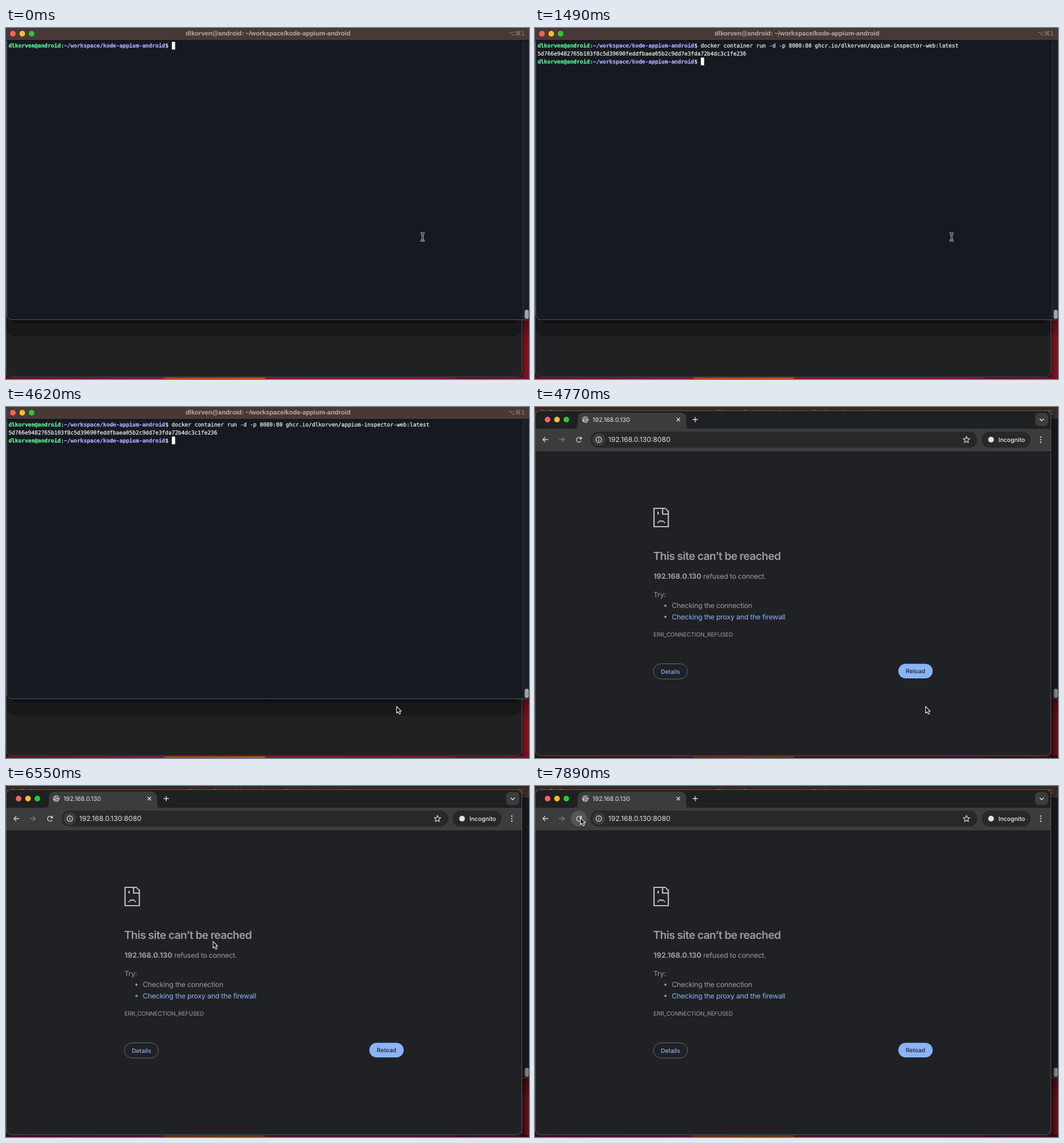
An HTML page with a canvas for the animation above (8000 ms loop, 914 by 613 pixels).

```html
<!DOCTYPE html>
<html lang="en">
<head>
<meta charset="utf-8">
<title>Terminal and browser</title>
<style>
  html, body { margin: 0; width: 100%; height: 100%; overflow: hidden; background: #202124; }
  canvas { display: block; }
</style>
</head>
<body>
<canvas id="stage" width="914" height="613"></canvas>
<script>
const ctx = document.getElementById('stage').getContext('2d');
const LOOP = 8000, STEP = 148;
const UI = 'Inter, "Liberation Sans", sans-serif';
const MONO = '"DejaVu Sans Mono", monospace';
const CELL = 5.703, LEFT = 4.4, ROW = 13.8;
const USER = 'dlkorven', FOLDER = '~/workspace/kode-appium-android';
const COMMAND = `docker container run -d -p 8080:80 ghcr.io/${USER}/appium-inspector-web:latest`;
const HASH = '5d766e9482765b103f8c5d39690feddfbaea05b2c9dd7e3fda72b4dc3c1fe236';
const PROMPT_LENGTH = 50;
const BROWSER_AT = 4770;

function rect(x, y, w, h, fill) {
  ctx.fillStyle = fill;
  ctx.fillRect(x, y, w, h);
}

function rounded(x, y, w, h, radius, fill, stroke) {
  ctx.beginPath();
  ctx.roundRect(x, y, w, h, radius);
  if (fill) { ctx.fillStyle = fill; ctx.fill(); }
  if (stroke) { ctx.lineWidth = 1; ctx.strokeStyle = stroke; ctx.stroke(); }
}

function dot(x, y, r, fill) {
  ctx.beginPath();
  ctx.arc(x, y, r, 0, 7);
  ctx.fillStyle = fill;
  ctx.fill();
}

function line(path, color, width = 1.3) {
  ctx.strokeStyle = color;
  ctx.lineWidth = width;
  ctx.stroke(new Path2D(path));
}

function text(value, x, y, font, color, spacing = 0, align = 'left') {
  ctx.font = font;
  ctx.fillStyle = color;
  ctx.letterSpacing = spacing + 'px';
  ctx.textAlign = align;
  ctx.fillText(value, x, y);
}

function gradient(x0, y0, x1, y1, ...stops) {
  const g = ctx.createLinearGradient(x0, y0, x1, y1);
  stops.forEach(([at, color]) => g.addColorStop(at, color));
  return g;
}

function lights(x, y) {
  ['#ff5f57', '#febc2e', '#28c840'].forEach((color, i) => dot(x + i * 16.4, y, 4.9, color));
}

// Terminal text gets a hairline outline for a slightly heavier weight.
function mono(value, column, row, color, weight = 400) {
  const x = LEFT + column * CELL, y = 34 + row * ROW;
  text(value, x, y, `${weight} 9.47px ${MONO}`, color);
  ctx.strokeStyle = color;
  ctx.lineWidth = 0.25;
  ctx.strokeText(value, x, y);
}

function prompt(row) {
  const host = USER + '@android';
  mono(host, 0, row, '#5cf59a', 700);
  mono(':', 16, row, '#f0f0f0');
  mono(FOLDER, 17, row, '#aaa9fb', 700);
  mono('$', 48, row, '#f0f0f0');
}

function drawDesktop() {
  rect(0, 0, 914, 613, '#2a1215');
  rect(901, 505, 13, 108, gradient(901, 0, 914, 0, [0, '#4c0e16'], [0.5, '#70131e'], [1, '#7c1521']));
  rect(901, 505, 13, 40, gradient(0, 505, 0, 545, [0, 'rgba(0,0,0,.4)'], [1, 'rgba(0,0,0,0)']));
  rect(0, 610, 914, 3, gradient(0, 0, 914, 0, [0, '#64121e'], [0.15, '#70152a'], [0.302, '#7c1a48'],
    [0.304, '#b04014'], [0.494, '#b84c14'], [0.496, '#84182a'], [0.856, '#7c1634'], [0.86, '#5c1220'], [1, '#701420']));
}

function drawTerminal(t) {
  rounded(0.5, 6.5, 901, 602.5, 9, '#202123', '#47484a');
  rounded(1, 490, 900, 48, [0, 0, 14, 14], '#17181a');
  rounded(10, 490, 884, 27, [0, 0, 12, 12], gradient(0, 509, 0, 517, [0, '#0a0b0d'], [1, '#121315']));

  rounded(1.5, -10, 920, 519.5, 9, '#151a20', '#55585b');
  rect(903, 22, 11, 486, '#1c2025');
  rect(903, 22, 1, 486, '#2c3034');
  rounded(906.5, 492, 7, 16, 3.5, '#a3a4a5');
  rect(0, 0, 914, 21, '#483936');
  rect(0, 21, 914, 1, '#0d0f12');
  lights(12, 10);
  text(`${USER}@android: ${FOLDER}`, 458, 13, 'bold 11.1px "Liberation Sans", sans-serif', '#b6aca9', 0, 'center');
  text('⌥⌘1', 907, 13, '10.5px "DejaVu Sans", sans-serif', '#93878a', 0, 'right');

  prompt(0);
  if (t >= 750) mono(COMMAND, PROMPT_LENGTH, 0, '#f0f0f0');
  if (t >= 1340) mono(HASH, 0, 1, '#f0f0f0');
  if (t >= 1490) prompt(2);
  const [column, row] =
    t < 750 ? [PROMPT_LENGTH, 0] :
    t < 1190 ? [PROMPT_LENGTH + COMMAND.length, 0] :
    t < 1340 ? [0, 1] :
    t < 1490 ? [0, 2] : [PROMPT_LENGTH, 2];
  rect(LEFT + column * CELL + 0.3, 24 + row * ROW, 5.7, 13.6, '#fafafa');
}

function drawTabs() {
  rect(1, 7, 900, 31, '#1f2021');
  lights(22, 22);
  rounded(75, 10, 189, 30, [9, 9, 0, 0], '#3c3c3c');
  line('M67 38.5Q75 38 75 30V39H67M272 38.5Q264 38 264 30V39H272', '#3c3c3c', 1);
  dot(88, 22, 5.8, '#b5b7ba');
  line('M83 20l4 1 1 3 -1 3M88 17l0 2 3 1 2 -1M92 25l-2 -2', '#3c3c3c', 1.2);
  text('192.168.0.130', 100.5, 25.5, `10.6px ${UI}`, '#e3e3e3');
  line('M247.5 19l6 6M253.5 19l-6 6M275.5 22h9M280 17.5v9', '#dedede');
  rounded(874, 10.5, 23, 23, 7, '#3c3c3c');
  line('M882 20.5l3.5 3.5 3.5-3.5', '#e3e3e3', 1.5);
}

function drawToolbar(hover) {
  rect(1, 38, 900, 38, '#3c3c3c');
  rect(1, 76, 900, 1, '#48494a');
  line('M23 57H14M18 52.8L13.8 57 18 61.2', '#d5d5d5');
  line('M42 57h9M47 52.8L51.2 57 47 61.2', '#7b7b7b');
  if (hover) dot(77, 57, 14, '#555555');
  line('M80.6 59.2A4.3 4.3 0 1 1 79.6 53.8L81 55.2M81.2 52v3.5h-3.5', '#d8d8d8');

  rounded(97, 43, 676, 28, 14, '#282828');
  dot(111.5, 57, 11, '#3c3c3c');
  line('M116.3 57a4.8 4.8 0 1 1 -9.6 0a4.8 4.8 0 1 1 9.6 0M111.5 56.5v3M111.5 54v1.3', '#e3e3e3', 1.2);
  text('192.168.0.130:8080', 128, 61, `12.1px ${UI}`, '#e3e3e3');
  line('M754 51.5l1.6 3.6 3.9.4-2.9 2.6.8 3.9-3.4-2-3.4 2 .8-3.9-2.9-2.6 3.9-.4z', '#d5d5d5', 1.2);
  rounded(780.5, 43, 85.5, 28, 14, '#282828');
  dot(797, 57, 5, '#e3e3e3');
  text('Incognito', 810, 61, `500 10.4px ${UI}`, '#f0f0f0');
  [52.5, 57, 61.5].forEach(y => dot(884, y, 1.2, '#d8d8d8'));
}

function drawSadPage() {
  const gray = '#bdbdbd';
  line('M229 177H208V209H233V182.5', gray, 2.2);
  line('M223 177V187H233', gray, 2.2);
  rect(228.5, 178, 2.5, 2.5, gray);
  rect(231, 180.3, 3, 2.6, gray);
  rect(214, 183, 2.3, 4.8, gray);
  rect(216.3, 198.3, 8.7, 2.3, gray);
  rect(214, 200.6, 2.3, 2.3, gray);
  rect(225, 200.6, 2.3, 2.3, gray);
}

function drawPage() {
  const gray = '#9a9da1', blue = '#8ab4f8', body = `12.3px ${UI}`;
  drawSadPage();
  text('This site can’t be reached', 206.5, 267, `600 19.2px ${UI}`, gray, -0.6);
  text('192.168.0.130', 207, 299.5, `700 12.7px ${UI}`, gray);
  text('refused to connect.', 294, 299.5, body, gray, -0.2);
  text('Try:', 207, 331.5, body, gray, -0.2);
  dot(228, 347, 1.9, gray);
  dot(228, 366.5, 1.9, gray);
  text('Checking the connection', 239, 351, body, gray, -0.2);
  text('Checking the proxy and the firewall', 239, 370.5, body, blue, -0.2);
  text('ERR_CONNECTION_REFUSED', 207, 400.5, `10px ${UI}`, gray, -0.1);
  rounded(207, 448.5, 59.5, 26.5, 13.25, null, '#656a70');
  text('Details', 236.7, 465.7, `500 10.3px ${UI}`, blue, 0, 'center');
  rounded(635, 448.5, 60, 25.5, 12.75, blue);
  text('Reload', 665, 465, `500 10.4px ${UI}`, '#202124', 0, 'center');
}

function drawBrowser(hover) {
  rect(0, 0, 914, 7, 'rgba(40,15,0,.4)');
  rect(902, 7, 12, 606, gradient(902, 0, 914, 0, [0, 'rgba(0,0,0,.45)'], [1, 'rgba(0,0,0,.15)']));
  rect(0, 609, 914, 4, 'rgba(0,0,0,.4)');
  rounded(0.5, 6.5, 901, 602.5, 9, '#202124', '#58595b');
  ctx.save();
  ctx.beginPath();
  ctx.roundRect(1, 7, 900, 601.5, 8.5);
  ctx.clip();
  drawTabs();
  drawToolbar(hover);
  ctx.restore();
  drawPage();
}

// Pointer moves: [start, steps, from x, from y, to x, to y, easing power]
const MOVES = [
  [3730, 1, 728, 365, 715, 387, 1],
  [3878, 6, 715, 387, 682.5, 523, 1],
  [5510, 5, 682.5, 523, 468.8, 321.8, 1.5],
  [6400, 2, 468.8, 321.8, 361.8, 271.5, 0.7],
  [6696, 6, 361.8, 271.5, 106.5, 78.5, 1.4],
  [7590, 3, 106.5, 78.5, 79.5, 55.8, 1.6]
];

function pointerAt(t) {
  const move = MOVES.findLast(([start]) => t >= start);
  if (!move) return [728, 365];
  const [start, steps, x0, y0, x1, y1, power] = move;
  const done = Math.min(steps, Math.floor((t - start) / STEP) + 1) / steps;
  const p = 1 - (1 - done) ** power;
  return [x0 + (x1 - x0) * p, y0 + (y1 - y0) * p];
}

function drawPointer(x, y, isText) {
  ctx.save();
  ctx.translate(x, y);
  if (isText) {
    const beam = 'M-3.5 -6.5Q0 -6.5 0 -4V4Q0 6.5 -3.5 6.5M3.5 -6.5Q0 -6.5 0 -4V4Q0 6.5 3.5 6.5M-2 1.2H2';
    line(beam, '#f0f0f0', 3);
    line(beam, '#111519', 1.3);
  } else {
    const arrow = new Path2D('M0 0V11.6L2.7 9.1 4.7 13.6 6.9 12.6 4.9 8.3H8.4Z');
    ctx.fillStyle = '#050505';
    ctx.fill(arrow);
    ctx.strokeStyle = '#f2f2f2';
    ctx.lineWidth = 1.1;
    ctx.lineJoin = 'round';
    ctx.stroke(arrow);
  }
  ctx.restore();
}

function draw(t) {
  const [x, y] = pointerAt(t);
  const inBrowser = t >= BROWSER_AT;
  ctx.textRendering = 'geometricPrecision';
  drawDesktop();
  drawTerminal(t);
  if (inBrowser) drawBrowser(Math.hypot(x - 77, y - 57) < 14);
  drawPointer(x, y, !inBrowser && y < 509);
}

const origin = performance.now();
function frame() {
  draw((performance.now() - origin) % LOOP);
  requestAnimationFrame(frame);
}
frame();
</script>
</body>
</html>
```
